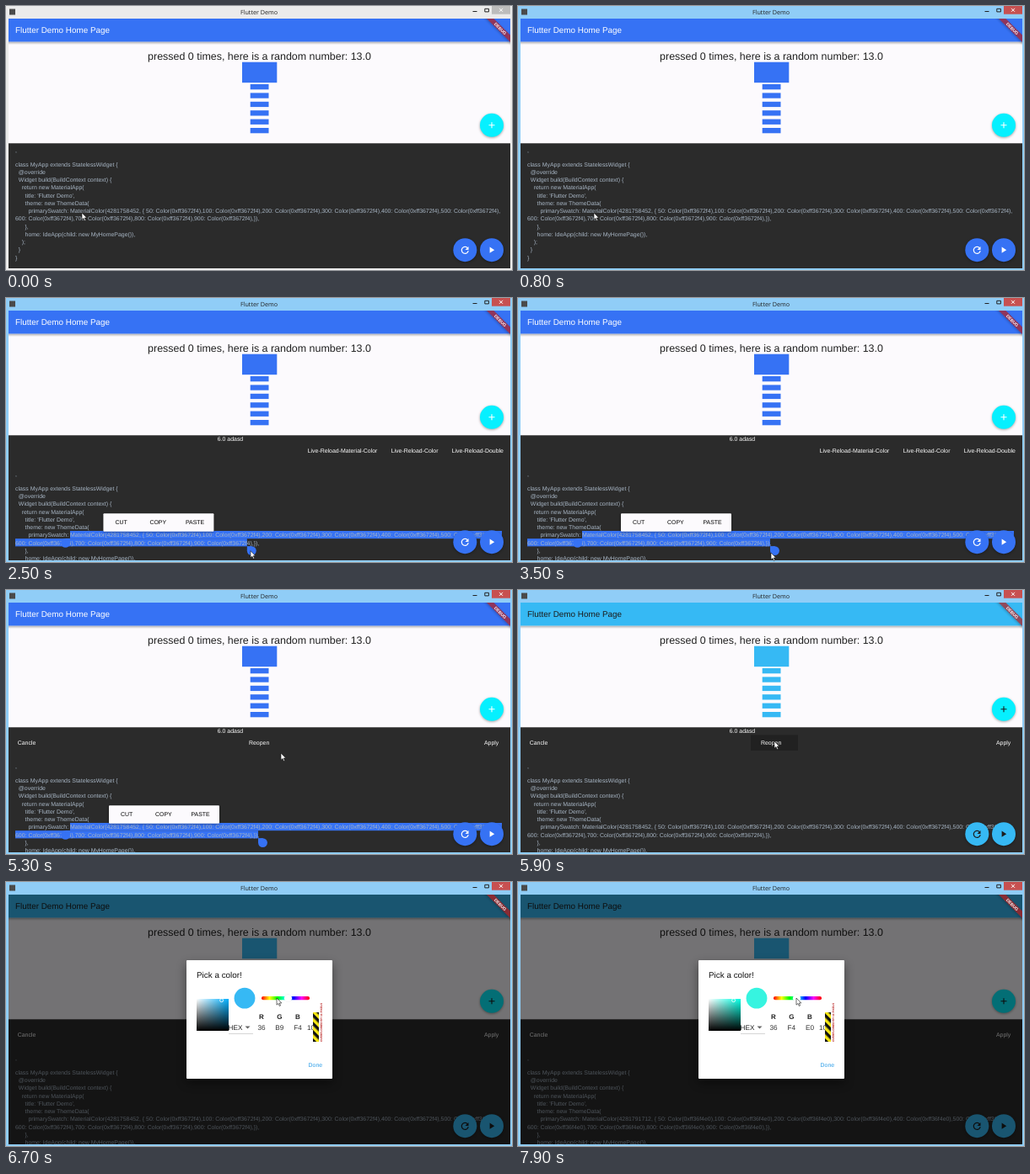
An HTML page that plays this animation: 600x314 px, repeating every 8 s.

```html
<!DOCTYPE html>
<html lang="en">
<head>
<meta charset="utf-8">
<title>Flutter Demo</title>
<style>
  html, body { margin: 0; width: 100%; height: 100%; overflow: hidden; }
  svg { display: block; width: 100vw; height: 100vh; }
  text {
    font: 6.93px "Liberation Sans", Arial, sans-serif;
    text-rendering: geometricPrecision;
    white-space: pre;
  }
  .mid { text-anchor: middle; }
  .primary { fill: var(--primary); }
  .on { fill: var(--on); }
  .picked { fill: var(--picked); }
  .raised { filter: drop-shadow(0 1.5px 1.5px rgba(0, 0, 0, .35)); }
  #code text { fill: #a9b7c6; }
  #actions text, #confirm text { fill: #fff; }
</style>
</head>
<body>
<svg id="stage" viewBox="0 0 600 314" preserveAspectRatio="none"></svg>
<script>
const LOOP = 8000, STEP = 100;
const LINE = 9.25, CODE_TOP = 190.6, CODE_SHIFT = 38.4;
const HUE = { start: 221.05, applied: 198.63, end: 173.68 };
const WORD_LEFT = 76, LINE_LEFT = 11, LINE_RIGHT = 588;
const SLIDER = { x: 303, width: 57 };

const hsvHex = (hue, sat, val) => [5, 3, 1].map(n => {
  const k = (n + hue / 60) % 6;
  const level = val * (1 - sat * Math.max(0, Math.min(k, 4 - k, 1)));
  return Math.round(level * 255).toString(16).padStart(2, '0');
}).join('');
const swatch = hue => hsvHex(hue, 190 / 244, 244 / 255);

// Piecewise linear track of [time, ...values] keys.
function track(keys, time) {
  const next = keys.findIndex(key => key[0] > time);
  if (next === 0) return keys[0].slice(1);
  if (next < 0) return keys[keys.length - 1].slice(1);
  const a = keys[next - 1], b = keys[next];
  const k = (time - a[0]) / (b[0] - a[0]);
  return a.slice(1).map((v, i) => v + (b[i + 1] - v) * k);
}

const cursorKeys = [
  [0, 90, 246], [900, 90, 246], [1200, 124, 290], [1600, 185, 291], [1900, 230, 293],
  [2600, 300, 302], [2700, 300, 303], [3800, 300, 303], [4300, 397, 179], [4900, 397, 179],
  [5300, 326, 194], [5700, 304, 180], [6100, 304, 180], [6700, 321, 138],
  [7000, 334, 138], [7900, 330, 138]
];
const selectionKeys = [[1200, 117], [1900, 204], [2000, 220], [2600, 299]];
const hueKeys = [[5600, HUE.start], [5800, HUE.applied]];
const pickKeys = [[7000, HUE.applied], [7900, HUE.end]];
const dialogKeys = [[6000, 0], [6200, 1]];

function codeLines(hex) {
  const color = `Color(0xff${hex})`;
  const shades = list => list.map(n => `${n}: ${color},`).join('');
  return [
    'class MyApp extends StatelessWidget {',
    '  @override',
    '  Widget build(BuildContext context) {',
    '    return new MaterialApp(',
    "      title: 'Flutter Demo',",
    '      theme: new ThemeData(',
    `        primarySwatch: MaterialColor(${parseInt('ff' + hex, 16)}, { ` + shades([50, 100, 200, 300, 400, 500]),
    shades([600, 700, 800, 900]) + '}),',
    '      },',
    '      home: IdeApp(child: new MyHomePage()),',
    '    );',
    '  }',
    '}'
  ];
}

const label = (x, y, text, attrs = '') => `<text x="${x}" y="${y}" ${attrs}>${text}</text>`;
const rect = (x, y, w, h, attrs = '') => `<rect x="${x}" y="${y}" width="${w}" height="${h}" ${attrs}/>`;
const sized = (px, more = '') => `style="font-size:${px}px;${more}"`;
const fab = (x, y, icon, attrs = 'class="primary"') =>
  `<g transform="translate(${x} ${y})"><g class="raised"><circle r="14" ${attrs}/></g>${icon}</g>`;
const handle = (id, corner) =>
  `<g id="${id}" class="primary"><circle r="5.45"/>${rect(corner, -5.45, 5.45, 5.45)}</g>`;
const stops = list => list.map(([offset, color, opacity = 1]) =>
  `<stop offset="${offset}" stop-color="${color}" stop-opacity="${opacity}"/>`).join('');

const rainbow = [0, 1, 2, 3, 4, 5, 6].map(i => [i / 6, '#' + hsvHex(i * 60, 1, 1)]);
const bars = [0, 1, 2, 3, 4, 5].map(i => rect(289.7, 93 + i * 10.4, 21.8, 6.3)).join('');

const defs = `<defs>
  <linearGradient id="rainbow">${stops(rainbow)}</linearGradient>
  <linearGradient id="whiten">${stops([[0, '#fff'], [1, '#fff', 0]])}</linearGradient>
  <linearGradient id="darken" x2="0" y2="1">${stops([[0, '#000', 0], [1, '#000']])}</linearGradient>
  <linearGradient id="barShadow" x2="0" y2="1">${stops([[0, '#000', .3], [1, '#000', 0]])}</linearGradient>
  <pattern id="hazard" width="7" height="7" patternUnits="userSpaceOnUse" patternTransform="rotate(45)">
    ${rect(0, 0, 7, 7, 'fill="#f5e815"')}${rect(0, 0, 7, 3.5, 'fill="#111"')}
  </pattern>
  <clipPath id="app">${rect(3, 15, 595, 297)}</clipPath>
  <clipPath id="fields">${rect(226, 120, 138, 75)}</clipPath>
</defs>`;

const windowFrame = rect(0, 0, 600, 314, 'id="frame"')
  + rect(4, 3.5, 7, 7, 'fill="#4a4a4a"')
  + label(300, 9.8, 'Flutter Demo', `class="mid" fill="#222" ${sized(7.2, "font-family:'Open Sans',sans-serif")}`)
  + rect(576, 0, 22, 9.7, 'id="close"')
  + `<path d="M585 2.8l4 4m0-4l-4 4" stroke="#fff" fill="none"/>
     <path d="M553.5 6.5h5M567.8 3.3h4.6v3.6h-4.6z" stroke="#222" fill="none"/>`;

const page = rect(3, 15, 595, 149, 'fill="#fcfafd"')
  + rect(3, 42.5, 595, 3.5, 'fill="url(#barShadow)"')
  + rect(3, 15, 595, 27.5, 'class="primary"')
  + label(11, 32.2, 'Flutter Demo Home Page', `class="on" ${sized(9.9)}`)
  + label(300.5, 64, 'pressed 0 times, here is a random number: 13.0', `class="mid" fill="#212121" ${sized(12.45)}`)
  + `<g class="primary">${rect(280, 66.7, 41.3, 24.5)}${bars}</g>`
  + fab(576, 141.8, '<path d="M-3.5 0h7M0-3.5v7" style="stroke:var(--on)" stroke-width="1.1"/>', 'fill="#06f0ff"');

const editor = rect(3, 163.3, 595, 149, 'fill="#2b2b2b"')
  + `<g id="selection" class="primary">${rect(WORD_LEFT, 277, 0, 9.2, 'id="firstRow"')}${rect(LINE_LEFT, 286.2, 0, 9.2, 'id="secondRow"')}</g>`
  + `<g id="code">${label(11, CODE_TOP - 17, ',')}${codeLines('').map((_, i) => label(11, CODE_TOP + i * LINE, '', 'class="line"')).join('')}</g>`
  + `<g id="handles">${handle('startHandle', 0)}${handle('endHandle', -5.45)}</g>`
  + `<g id="popup"><g class="raised">${rect(0, 256.2, 131, 21.5, 'rx="1" fill="#fcfafd"')}</g>
     ${label(14, 269.4, 'CUT')}${label(55, 269.4, 'COPY')}${label(97.5, 269.4, 'PASTE')}</g>`
  + label(250.8, 170.2, '6.0 adasd', 'id="note" fill="#fff"')
  + `<g id="actions">${label(357.7, 183.8, 'Live-Reload-Material-Color')}${label(456.7, 183.8, 'Live-Reload-Color')}${label(528.7, 183.8, 'Live-Reload-Double')}</g>`
  + `<g id="confirm">${rect(276, 172.5, 56, 18.5, 'id="pressed" fill="#212121"')}
     ${label(13.7, 183.8, 'Cancle')}${label(288, 183.8, 'Reopen')}${label(567, 183.8, 'Apply')}</g>`
  + fab(544.3, 290.2, `<path d="M3.2-2.2A4 4 0 1 0 3.9 1" fill="none" style="stroke:var(--on)" stroke-width="1.2"/>
     <path d="M4.2-4.3v4h-4z" class="on"/>`)
  + fab(576, 290.2, '<path d="M-2.4-3.6v7.2L3.2 0z" class="on"/>');

const channel = (x, name, id) => label(x, 162.6, name, `class="mid" fill="#222" ${sized(8, 'font-weight:bold')}`)
  + label(x, 176.3, '', `id="${id}" class="mid" fill="#333" ${sized(8.2)}`);

const dialog = `<g id="dialog">
  ${rect(3, 15, 595, 297, 'opacity=".54"')}
  <g style="filter:drop-shadow(0 5px 6px rgba(0,0,0,.45))">${rect(214, 93, 173, 141, 'rx="1" fill="#fff"')}</g>
  ${label(226, 113.8, 'Pick a color!', `fill="#111" ${sized(9.9)}`)}
  ${rect(226, 139, 38, 38, 'id="field"')}
  ${rect(226, 139, 38, 38, 'fill="url(#whiten)"')}
  ${rect(226, 139, 38, 38, 'fill="url(#darken)"')}
  <circle cx="255.6" cy="140.7" r="2" fill="none" stroke="#fff" stroke-width=".8"/>
  <circle cx="283" cy="138.2" r="12.4" class="picked"/>
  ${rect(SLIDER.x, 136, SLIDER.width, 4.3, 'rx="2" fill="url(#rainbow)"')}
  <circle id="thumb" cy="138.2" r="4.6" fill="#fff" style="filter:drop-shadow(0 .4px .4px rgba(0,0,0,.15))"/>
  <g clip-path="url(#fields)">
    ${label(263.6, 175.6, 'HEX', `fill="#222" ${sized(8.2)}`)}
    <path d="M283.5 171.6h6l-3 3z" fill="#666"/>
    ${rect(264, 180, 29, .6, 'fill="#bbb"')}
    ${channel(303, 'R', 'red')}${channel(324.3, 'G', 'green')}${channel(346, 'B', 'blue')}
    ${label(357, 176.3, '100', `fill="#333" ${sized(8.2)}`)}
  </g>
  ${rect(364, 155, 7, 35, 'fill="url(#hazard)"')}
  ${label(0, 0, 'OVERFLOWED BY 11 PIXELS', `transform="translate(374.6 190) rotate(-90)" fill="#b71c1c" ${sized(3.3, 'font-weight:bold')}`)}
  ${label(358.6, 220.4, 'Done', 'fill="#2f9fe8"')}
</g>`;

const banner = `<g transform="translate(586.1 26.9) rotate(45)">
  ${rect(-25, -3, 50, 6, 'fill="#b71c1c" opacity=".7" class="raised"')}
  ${label(0, 1.8, 'DEBUG', `class="mid" fill="#fff" ${sized(5, 'font-weight:bold')}`)}
</g>`;

const stage = document.getElementById('stage');
stage.innerHTML = defs + windowFrame
  + `<g clip-path="url(#app)">${page}${editor}${dialog}${banner}</g>`
  + '<path id="cursor" d="M0 0v8.2l1.9-1.7 1.4 3 1.3-.6-1.4-2.9h2.6z" fill="#fff" stroke="#111" stroke-width=".6"/>';

const el = id => document.getElementById(id);
const set = (id, name, value) => el(id).setAttribute(name, value);
const move = (id, x, y) => set(id, 'transform', `translate(${x} ${y})`);
const show = (id, on) => { el(id).style.display = on ? '' : 'none'; };
const codeRows = [...document.querySelectorAll('.line')];

function drawSelection(time) {
  const [end] = track(selectionKeys, time);
  const twoRows = time >= 2000;
  const active = time >= 900 && time < 5800;
  for (const id of ['selection', 'handles', 'popup']) show(id, active);
  set('firstRow', 'width', (twoRows ? LINE_RIGHT : end) - WORD_LEFT);
  set('secondRow', 'width', twoRows ? end - LINE_LEFT : 0);
  move('startHandle', WORD_LEFT - 5.45, 291.4);
  move('endHandle', end + 5.45, twoRows ? 300.6 : 291.4);
  move('popup', (WORD_LEFT + end) / 2 - 65.5, 0);
}

function drawDialog(time, hue) {
  const [opacity] = track(dialogKeys, time);
  const hex = swatch(hue);
  set('dialog', 'opacity', opacity);
  set('field', 'fill', '#' + hsvHex(hue, 1, 1));
  set('thumb', 'cx', SLIDER.x + SLIDER.width * hue / 360);
  ['red', 'green', 'blue'].forEach((id, i) => {
    el(id).textContent = hex.slice(i * 2, i * 2 + 2).toUpperCase();
  });
}

function draw(time) {
  const focused = time >= 200, opened = time >= 900, confirming = time >= 4600;
  const [pick] = track(pickKeys, time);
  stage.style.setProperty('--primary', '#' + swatch(track(hueKeys, time)[0]));
  stage.style.setProperty('--on', time < 5700 ? '#fff' : '#1c1c1c');
  stage.style.setProperty('--picked', '#' + swatch(pick));
  set('frame', 'fill', focused ? '#90cdf7' : '#ebebeb');
  set('close', 'fill', focused ? '#c75050' : '#bcbcbc');

  move('code', 0, opened ? CODE_SHIFT : 0);
  codeLines(swatch(time < 7000 ? HUE.start : pick)).forEach((line, i) => { codeRows[i].textContent = line; });
  show('note', opened);
  show('actions', opened && !confirming);
  show('confirm', confirming);
  show('pressed', time >= 5800 && time < 6200);

  drawSelection(time);
  drawDialog(time, pick);
  move('cursor', ...track(cursorKeys, time));
}

const origin = performance.now();
function tick() {
  const time = (performance.now() - origin) % LOOP;
  draw(Math.floor(time / STEP) * STEP);
  requestAnimationFrame(tick);
}
tick();
</script>
</body>
</html>
```
